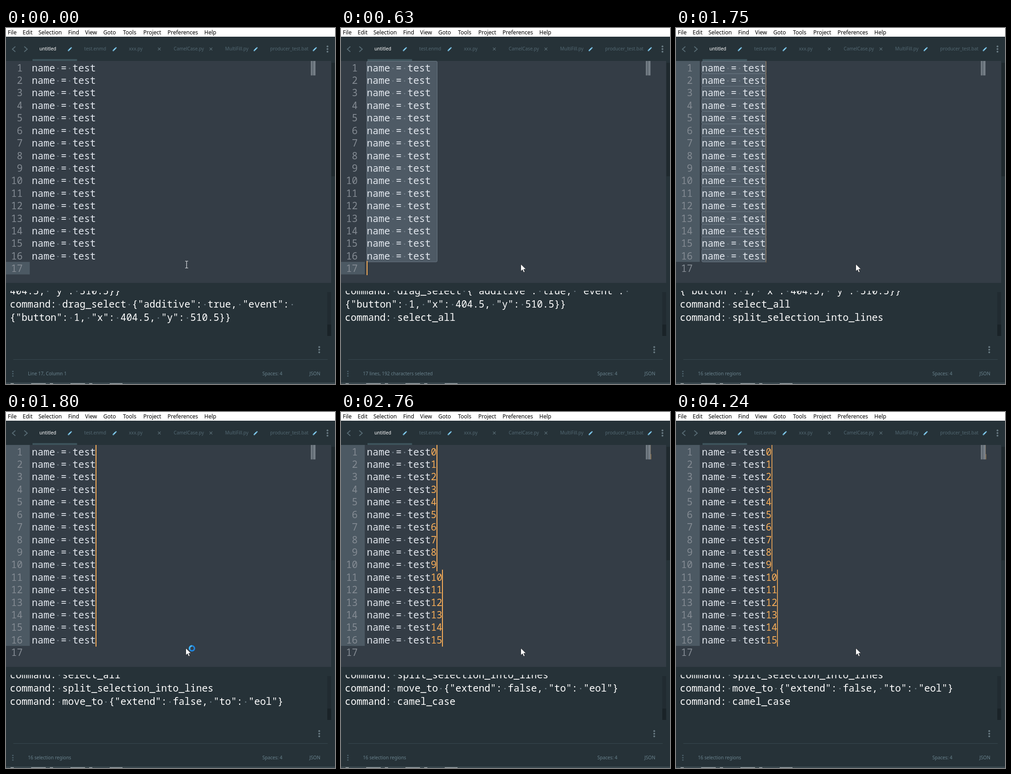
An HTML page that plays this animation: 720x778 px, repeating every 4320 ms.

```html
<!DOCTYPE html>
<html lang="en">
<head>
<meta charset="utf-8">
<title>Numbering lines in an editor</title>
<style>
  html, body { margin: 0; width: 100%; height: 100%; overflow: hidden; background: #263238; }
  svg { display: block; width: 720px; height: 778px; }
  text { white-space: pre; }
  .ui { font-family: "Noto Sans", "Open Sans", sans-serif; font-size: 10.1px; }
  .menu { font-size: 12px; fill: #000; }
  .mono { font-family: "Noto Sans Mono", "DejaVu Sans Mono", monospace; }
  .code { font-size: 21.2px; fill: #e2e7ee; }
  .log { font-size: 21.23px; fill: #fff; font-weight: 500; }
</style>
</head>
<body>
<svg id="stage" viewBox="0 0 720 778">
  <defs>
    <clipPath id="editorClip"><rect y="72" width="711" height="485"/></clipPath>
    <clipPath id="logClip"><rect y="574.5" width="702" height="100"/></clipPath>
  </defs>
</svg>
<script>
const LOOP = 4320, ROWS = 16, TOP = 72.4, ROW_H = 27.42, CODE_X = 56.5, CODE_W = 12.72, LOG_W = 12.74;
const stage = document.getElementById("stage");

function add(parent, tag, attrs, text) {
  const node = document.createElementNS("http://www.w3.org/2000/svg", tag);
  for (const key in attrs) node.setAttribute(key, attrs[key]);
  if (text !== undefined) node.textContent = text;
  parent.appendChild(node);
  return node;
}
const group = (parent, attrs = {}) => add(parent, "g", attrs);
const rect = (parent, x, y, width, height, fill, more = {}) =>
  add(parent, "rect", { x, y, width, height, fill, ...more });
const label = (x, y, text, fill, more = {}) =>
  add(stage, "text", { class: "ui", x, y, fill, ...more }, text);
const stroke = (d, color, width) =>
  add(stage, "path", { d, fill: "none", stroke: color, "stroke-width": width });
const show = (node, on) => node.setAttribute("display", on ? "inline" : "none");
const rowTop = i => TOP + i * ROW_H;

// Monospaced line with visible spaces
function monoLine(parent, cls, x, y, text, advance, dotColor) {
  add(parent, "text", { class: "mono " + cls, x, y }, text);
  [...text].forEach((ch, i) => {
    if (ch === " ") add(parent, "circle", { cx: x + (i + 0.5) * advance, cy: y - 6.3, r: 1.5, fill: dotColor });
  });
}
function kebab(x, y, gap, r, fill) {
  for (const k of [-1, 0, 1]) add(stage, "circle", { cx: x, cy: y + k * gap, r, fill });
}

// Menu bar
rect(stage, 0, 0, 720, 19, "#fff");
[["File", 4], ["Edit", 36.5], ["Selection", 71], ["Find", 136], ["View", 173], ["Goto", 213],
 ["Tools", 256], ["Project", 300.5], ["Preferences", 353.5], ["Help", 434]]
  .forEach(([text, x]) => label(x, 14, text, "#000", { class: "ui menu" }));

// Tab bar
stroke("M20.5 40.5L14 46.3l6.5 5.8M40 40.5l6.5 5.8-6.5 5.8", "#566a73", 2);
[["untitled", 73], ["test.enmd", 171], ["xxx.py", 269], ["CamelCase.py", 367],
 ["MultiFill.py", 479.5], ["producer_test.bat", 578]]
  .forEach(([text, x], i) => label(x, 49, text, i ? "#526771" : "#fff", i ? {} : { "font-weight": 500 }));
for (const x of [140, 238, 546.5, 676]) {
  stroke(`M${x - 2.8} 48.8l5 -5`, "#81cdf2", 2.8);
  stroke(`M${x + 2.6} 43.4l1 -1`, "#81cdf2", 2.8);
  add(stage, "path", { d: `M${x - 4.5} 50.5v-3l3 3z`, fill: "#81cdf2" });
}
for (const x of [335.5, 448.5]) stroke(`M${x - 3} 42.8l6 6m0 -6l-6 6`, "#5c7079", 1.2);
kebab(703.5, 46, 5.8, 2, "#687a82");

// Editor and its scroll thumb
rect(stage, 0, 72, 711.5, 485, "#343d46");
rect(stage, 712, 76, 8, 248, "#1f292e");
rect(stage, 58, 68, 97.5, 4, "#3d535b");
const editor = group(stage, { "clip-path": "url(#editorClip)" });
const lastGutter = rect(editor, 0, rowTop(ROWS), 52, ROW_H, "#4c5963");
const allGutter = rect(editor, 0, 72, 52, rowTop(ROWS) - 72, "#4c5963");
const selected = { rx: 2.5, stroke: "#697783", "stroke-width": 1 };
const blockSel = rect(editor, 56.5, 72.5, 154, rowTop(ROWS) - 72.5, "#4e5a65", selected);
const lineSel = group(editor);
const digits = group(editor);
for (let i = 0; i <= ROWS; i++) {
  const base = rowTop(i) + 22.2;
  add(editor, "text", { class: "mono", "font-size": 21.2, x: 36.4, y: base, "text-anchor": "end", fill: "#848b93" }, i + 1);
  if (i === ROWS) break;
  rect(lineSel, 56.5, rowTop(i) + 0.1, 140.5, ROW_H, "#4e5a65", selected);
  monoLine(editor, "code", CODE_X, base, "name = test", CODE_W, "#6d7984");
  add(digits, "text", { class: "mono", "font-size": 21.2, x: CODE_X + 11 * CODE_W, y: base, fill: "#f9ae58" }, i);
}

// Minimap
rect(stage, 667, 72, 10.5, 31.5, "#566069");
rect(stage, 667, 72, 3.5, 31.5, "#727b83");
rect(stage, 672.5, 72, 4.5, 31.5, "#767f87");
const miniDigits = group(stage);
rect(miniDigits, 677, 72, 1, 31.5, "#7d7263");
rect(miniDigits, 678, 92, 1, 11.5, "#8f7450");

// Carets
const carets = group(editor, { fill: "#f9ae58" });
const caretSet = (xOf, from, to) => {
  const g = group(carets);
  for (let i = from; i < to; i++) add(g, "rect", { x: xOf(i), y: rowTop(i) - 2, width: 2, height: 31 });
  return g;
};
const lastCaret = caretSet(() => 56, ROWS, ROWS + 1);
const endCarets = caretSet(() => 196, 0, ROWS);
const digitCarets = caretSet(i => i < 10 ? 209 : 221, 0, ROWS);

// Console
rect(stage, 703, 577, 8.5, 96, "#212b31");
rect(stage, 703, 648, 8.5, 25, "#1a2328");
const logs = [
  '404.5, "y": 510.5}}',
  'command: drag_select {"additive": true, "event": ',
  '{"button": 1, "x": 404.5, "y": 510.5}}',
  'command: select_all',
  'command: split_selection_into_lines',
  'command: move_to {"extend": false, "to": "eol"}',
  'command: camel_case'
];
const logBox = group(stage, { "clip-path": "url(#logClip)" });
const logLines = logs.map(text => {
  const g = group(logBox);
  monoLine(g, "log", 8.5, 0, text, LOG_W, "#6a7a82");
  return g;
});
kebab(685.5, 703, 5.7, 2, "#687a82");

// Status bar
rect(stage, 16, 724, 688, 1, "#37484f");
kebab(15, 755.5, 5, 1.6, "#4d626c");
const status = label(48, 759, "", "#69828d");
label(561, 758.8, "Spaces: 4", "#69828d");
label(664, 758.8, "JSON", "#69828d");
rect(stage, 0, 775.5, 720, 1.5, "#4b5a61");
add(stage, "path", { d: "M10 777.2H255", stroke: "#b4babd", "stroke-width": 1.2, "stroke-dasharray": "7 38 32 9" });

// Pointers
const beam = group(stage);
add(beam, "path", { d: "M392 509.5h2.5l.8 .7.8-.7h2.5M395.3 510v14M392 524.5h2.5l.8-.7.8 .7h2.5",
  fill: "none", stroke: "#dfe3e6", "stroke-width": 1.2 });
const arrow = add(stage, "path", { d: "M393.5 516v15.8l3.7-3.5 2.5 5.9 2.7-1.1-2.5-5.8h5z",
  fill: "#fff", stroke: "#15191c", "stroke-width": 0.8 });
const busy = group(stage, { fill: "none", "stroke-width": 3.2 });
add(busy, "circle", { cx: 407, cy: 516.6, r: 5.4, stroke: "#1f86e0" });
add(busy, "path", { d: "M402.3 519.3a5.4 5.4 0 0 1 4.7-8.1", stroke: "#45b4f5" });

// Command times and caret blink levels, both held until the next entry
const commands = [0, 630, 1200, 1800, 2760];
const blink = [[0, 0], [210, .5], [320, 1], [940, .6], [1070, .2], [1200, 1]];
const fade = (times, from, to) => times.forEach((t, i) =>
  blink.push([t, from + (to - from) * (i + 1) / times.length]));
fade([1630, 1690, 1740], 1, .25);
blink.push([1800, 1]);
fade([2190, 2250, 2320, 2380], 1, 0);
blink.push([2760, 1]);
fade([3130, 3190, 3260, 3320], 1, 0);
fade([3750, 3830, 3920], 0, 1);
blink.push([4240, .8]);

function draw(t) {
  const step = commands.filter(start => start <= t).length - 1;
  carets.setAttribute("opacity", blink.filter(([start]) => start <= t).pop()[1]);
  show(lastGutter, step < 2);
  show(allGutter, step > 1);
  show(blockSel, step === 1);
  show(lineSel, step === 2);
  show(lastCaret, step < 2);
  show(endCarets, step === 2 || step === 3);
  show(digitCarets, step === 4);
  show(digits, step === 4);
  show(miniDigits, step === 4);
  show(beam, step === 0);
  show(arrow, step > 0);
  show(busy, t >= 1800 && t < 2050);
  logLines.forEach((line, i) => {
    const slot = i - step;
    show(line, slot >= 0 && slot < 3);
    line.setAttribute("transform", `translate(0 ${581.6 + slot * 29.2})`);
  });
  status.textContent = ["Line 17, Column 1", "17 lines, 192 characters selected"][step] || "16 selection regions";
}

const origin = performance.now();
function tick() {
  draw((performance.now() - origin) % LOOP);
  requestAnimationFrame(tick);
}
draw(0);
requestAnimationFrame(tick);
</script>
</body>
</html>
```
